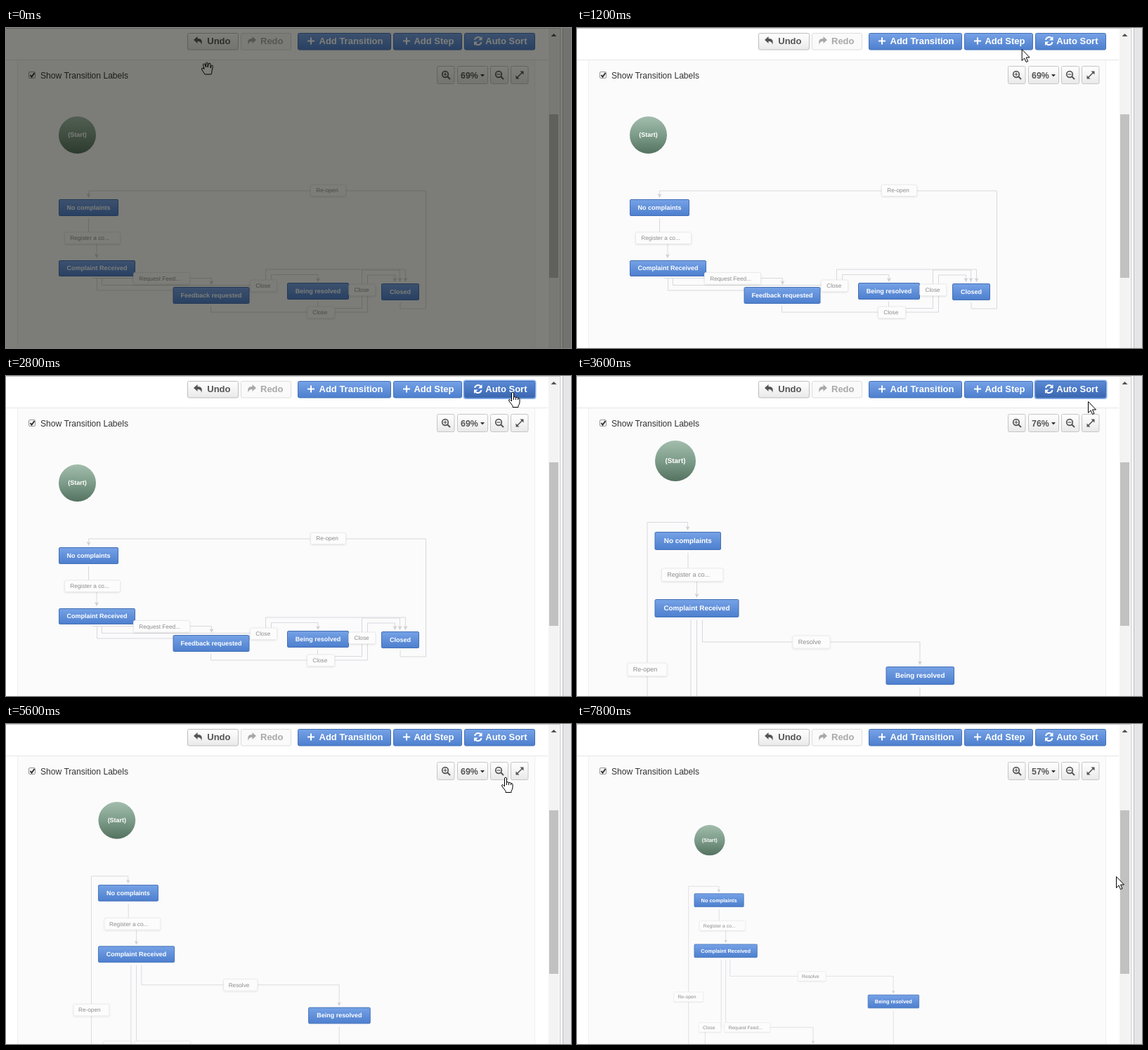
An HTML page that plays this animation: 804 by 456 pixels, repeating every 8 s.

```html
<!DOCTYPE html>
<html lang="en">
<head>
<meta charset="utf-8">
<title>Workflow editor</title>
<style>
  html, body { margin: 0; width: 100%; height: 100%; overflow: hidden; background: #fff; }
  svg { display: block; width: 804px; height: 456px; font-family: "Liberation Sans", Arial, sans-serif; }
  text { white-space: pre; }
  .wire { fill: none; stroke: #d9d9dc; stroke-linejoin: round; }
  .head { fill: #cfcfd3; }
  .node { fill: url(#blue); stroke: #4470b5; }
  .name { fill: #fff; font-weight: bold; text-anchor: middle; }
  .label { fill: #fcfcfc; stroke: #ebebed; filter: url(#soft); }
  .note { fill: #8c8c8c; }
  .btn { font-weight: bold; font-size: 13px; }
  .icon { fill: none; stroke: currentColor; stroke-width: 2; }
  .cursor { fill: #fff; stroke: #000; stroke-linejoin: round; }
</style>
</head>
<body>
<svg viewBox="0 0 804 456">
  <defs>
    <linearGradient id="blue" x2="0" y2="1"><stop stop-color="#76a2e6"/><stop offset="1" stop-color="#4d7fce"/></linearGradient>
    <linearGradient id="hover" x2="0" y2="1"><stop stop-color="#5f8fd9"/><stop offset="1" stop-color="#416fbb"/></linearGradient>
    <linearGradient id="active" x2="0" y2="1"><stop stop-color="#5a8ad6"/><stop offset="1" stop-color="#3a66b0"/></linearGradient>
    <linearGradient id="grey" x2="0" y2="1"><stop stop-color="#fff"/><stop offset="1" stop-color="#e9e9e9"/></linearGradient>
    <linearGradient id="green" x2="0" y2="1"><stop stop-color="#a3bdad"/><stop offset=".5" stop-color="#7d9c89"/><stop offset="1" stop-color="#557261"/></linearGradient>
    <filter id="soft" x="-10%" y="-20%" width="120%" height="150%"><feDropShadow dx="0" dy="1" stdDeviation="1" flood-opacity=".1"/></filter>
  </defs>
  <path fill="#fff" d="M0 0H804V456H0Z"/>
  <path fill="#fbfbfc" stroke="#efeff0" d="M16.5 45.5H752.5V460H16.5Z"/>
  <path stroke="#e6e6e6" d="M0 45.5H771"/>
  <g id="graphs"></g>
  <g id="bar"></g>
  <path fill="#f3f3f3" d="M772 1H787V456H772Z"/>
  <path fill="#c1c1c1" d="M773 123H786V356H773Z"/>
  <path fill="#505050" d="M775.5 12L779.5 8L783.5 12Z"/>
  <path stroke="#c4c4c6" d="M0 .5H789M788.5 0V456"/>
  <path fill="#e6e6e9" d="M792 0H804V456H792Z"/>
  <path stroke="#bcbcc0" d="M792.5 0V456"/>
  <g id="cursors"></g>
  <path id="dim" fill="#080800" opacity=".52" d="M0 0H804V456H0Z"/>
</svg>
<script>
const $ = id => document.getElementById(id);
const rect = (cls, x, y, w, h, r = 2, more = '') =>
  `<rect class="${cls}" x="${x}" y="${y}" width="${w}" height="${h}" rx="${r}" ${more}/>`;
const text = (cls, x, y, s, more = '') => `<text class="${cls}" x="${x}" y="${y}" ${more}>${s}</text>`;

// Workflow diagram: circle [x, y, r], wires, arrow tips, boxes [x, y, w, h, text]
function graph(id, size, { start: [cx, cy, r], wires, tips, nodes, labels }) {
  const name = (x, y, s) => text('name', x, y + size * .33, s, `font-size="${size}"`);
  return `<g id="${id}" text-rendering="geometricPrecision">` +
    `<path class="wire" d="${wires}"/>` +
    tips.map(([x, y]) => `<path class="head" d="M${x} ${y + 1}l-3 -6l3 1.5l3 -1.5Z"/>`).join('') +
    `<circle cx="${cx}" cy="${cy}" r="${r}" fill="url(#green)"/>` + name(cx, cy - .5, '(Start)') +
    nodes.map(([x, y, w, h, s]) => rect('node', x, y, w, h, 1.5) + name(x + w / 2, y + h / 2, s)).join('') +
    labels.map(([x, y, w, h, s]) => rect('label', x, y, w, h) +
      text('note', x + 7.7, y + h / 2 + size * .31, s, `font-size="${size * .92}"`)).join('') + '</g>';
}

$('graphs').innerHTML = graph('before', 9, {
  start: [101.5, 152.5, 26.5],
  wires: `M561 391V400H597.5V232H117.5V240 M117.5 271V299H129V327 M123 356.5H292.5V364
    M136.5 357V366.5H369.5V344H568.5V361 M129.5 357V374H377.5V351.5H444V361
    M291.5 396V405H514.5V352H553.5V361 M443.5 390V399.5H506.5V345H560.5V361`,
  tips: [[117.5, 241], [129, 327], [292.5, 365], [444, 361], [553.5, 361], [560.5, 361], [568.5, 361]],
  nodes: [[75.5, 244.5, 84, 23, 'No complaints'], [75.5, 331.5, 108, 22, 'Complaint Received'],
    [238, 369.5, 108, 23, 'Feedback requested'], [400.5, 363.5, 87, 23, 'Being resolved'],
    [534.5, 364.5, 53, 23, 'Closed']],
  labels: [[433.5, 223.5, 50, 16, 'Re-open'], [83.5, 291, 79, 16.5, 'Register a co...'],
    [181.5, 348.5, 80, 16.5, 'Request Feed...'], [347.5, 359, 38, 16.5, 'Close'],
    [487.8, 365, 38, 16.5, 'Close'], [428.5, 397, 39, 16.5, 'Close']]
}) + graph('after', 9.85, {
  start: [140, 121, 29],
  wires: `M100 540V208.5H157.5V219 M158 252V283H170.5V314 M178.5 348V379H488V410
    M162 348V476H131.5V540 M170.5 348V476H336V506 M488 444V540`,
  tips: [[157.5, 219], [170.5, 315], [488, 411], [336, 506]],
  nodes: [[111, 222.5, 93.5, 25, 'No complaints'], [111, 318.5, 119, 25, 'Complaint Received'],
    [440, 414.5, 96.5, 25, 'Being resolved']],
  labels: [[120.5, 274, 87.5, 18.5, 'Register a co...'], [307, 370, 53, 18, 'Resolve'],
    [72, 409, 56, 18.5, 'Re-open'], [119.4, 467, 42, 18, 'Close'], [167.8, 467, 87, 18, 'Request Feed...']]
});

// Toolbar
const button = (x, w, s, color, fill, border, icon, id = '') =>
  `<g color="${color}">` + rect('btn', x, 7.5, w, 23.5, 2, `${id} fill="${fill}" stroke="${border}"`) +
  icon + text('btn', x + w - 11, 23, s, 'fill="currentColor" text-anchor="end"') + '</g>';
const plus = x => `<path class="icon" stroke-width="2.4" d="M${x} 18.5h10m-5 -5v10"/>`;
const back = '<path fill="currentColor" d="M0 5L5.5 0V3C11 3 13 6 11 12C11 8.500 9 7 5.5 7V10Z"/>';
const small = (x, w, inner) => rect('', x, 54.5, w, 25, 2, 'fill="url(#grey)" stroke="#c6c6c6"') +
  `<g color="#555">${inner}</g>`;
const lens = (x, sign) => `<circle class="icon" cx="${x}" cy="66" r="4.300" style="stroke-width:1.7"/>` +
  `<path class="icon" d="M${x + 3} 69l4 4"/><path class="icon" style="stroke-width:1.2" d="${sign}"/>`;
const sync = `<g class="icon"><path d="M667 17a5 5 0 0 1 8.500 -2.500M676.500 20a5 5 0 0 1 -8.500 2.500"/>
  <path fill="currentColor" stroke="none" d="M677.500 12v5.500h-5.500ZM666 25v-5.500h5.500Z"/></g>`;

$('bar').innerHTML =
  button(258.5, 72, 'Undo', '#555', 'url(#grey)', '#bdbdbd', `<g transform="translate(267 12)">${back}</g>`) +
  button(334.5, 71, 'Redo', '#a9a9a9', '#fafafa', '#dcdcdc', `<g transform="translate(356 12) scale(-1 1)">${back}</g>`) +
  button(415.5, 132, 'Add Transition', '#fff', 'url(#blue)', '#4470b5', plus(429)) +
  button(551.5, 97, 'Add Step', '#fff', 'url(#blue)', '#4470b5', plus(565)) +
  rect('', 651.5, 6.5, 102, 25.5, 3, 'id="ring" fill="none" stroke="#8db4ee" stroke-width="2"') +
  button(652.5, 100, 'Auto Sort', '#fff', 'url(#blue)', '#4470b5', sync, 'id="sort"') +
  rect('', 32.5, 62.5, 9, 9, 1.5, 'fill="#f4f4f4" stroke="#999"') +
  '<path fill="none" stroke="#333" stroke-width="2" d="M34.500 67l2 2.500l4 -5.500"/>' +
  text('', 49, 72, 'Show Transition Labels', 'font-size="12.1" fill="#333"') +
  small(613.5, 24.5, lens(625, 'M622.500 66h5m-2.500 -2.500v5')) +
  small(642.5, 43, text('', 647, 72, '', 'id="zoom" font-size="12.4" font-weight="bold" fill="#555"') +
    '<path fill="#333" d="M675 66h6l-3 3.500Z"/>') +
  small(689.5, 25, lens(701, 'M698.500 66h5')) +
  small(718.5, 24.5, `<path class="icon" style="stroke-width:1.6" d="M727 71l8 -8"/>
    <path fill="currentColor" d="M731.500 61.500h5v5ZM725.500 67.500v5h5Z"/>`);

// Pointer shapes, each with its hot spot at 0,0
const shapes = {
  grab: 'M-4 18L-8 12Q-9.500 9 -7 9L-5 10.500L-6.500 4Q-5.500 2 -4 3.500L-2.500 8V2Q-1.500 0 0 2V8L1.500 2.500Q3 1 4 3V9L5.500 5.500Q7 4.500 7.500 6.500L6 13Q6 16 5 18Z',
  arrow: 'M.5 .5V16.500L4 13L6.500 18.500L9 17.500L6.500 12H11.500Z',
  point: 'M-1.500 14V2Q0 0 1.500 2V8Q3 7 4.500 8.500Q6 7.500 7.500 9.500Q9.500 9 10 11V15Q10 18 8 20.500V22.500H0V20.500L-5 14Q-6.500 11.500 -4 11.500ZM1.500 8V12M4.500 8.500V12M7.500 9.500V12'
};
$('cursors').innerHTML = Object.keys(shapes).map(k => `<path class="cursor" id="${k}" d="${shapes[k]}"/>`).join('');

// Pointer path: time, x, y, shape from then on
const path = [
  [0, 287, 48, 'grab'], [200, 287, 48, 'grab'], [800, 470, 40, 'arrow'], [1400, 714, 25, 'point'],
  [1600, 721, 22, 'point'], [2800, 721, 22, 'point'], [3200, 723, 27, 'point'], [3400, 727, 34, 'arrow'],
  [3600, 727, 36, 'arrow'], [4200, 715, 84, 'arrow'], [4400, 715, 84, 'arrow'], [4800, 711, 77, 'point'],
  [5000, 711, 75, 'point'], [7400, 711, 75, 'point'], [7600, 712, 70, 'point'], [7800, 767, 217, 'arrow']
];
const clicks = [5200, 5800, 6600];
const ease = p => { p = Math.min(1, Math.max(0, p)); return p * p * (3 - 2 * p); };

function draw(t) {
  const i = path.findLastIndex(k => k[0] <= t);
  const a = path[i], b = path[i + 1] || a;
  const p = b === a ? 0 : (t - a[0]) / (b[0] - a[0]);
  for (const k in shapes) $(k).setAttribute('visibility', k === a[3] ? 'visible' : 'hidden');
  $(a[3]).setAttribute('transform', `translate(${a[1] + (b[1] - a[1]) * p} ${a[2] + (b[2] - a[2]) * p})`);

  const sorted = t >= 3200;
  const steps = clicks.reduce((n, c) => n + ease((t - c) / 400), 0);
  $('before').setAttribute('display', sorted ? 'none' : 'inline');
  $('after').setAttribute('display', sorted ? 'inline' : 'none');
  $('after').setAttribute('transform', `translate(336 300) scale(${1.1 ** -steps}) translate(-336 -300)`);
  $('zoom').textContent = (sorted ? Math.round(76 * 1.1 ** -Math.ceil(steps)) : 69) + '%';

  const style = t < 1400 || t >= 5400 ? 'blue' : t < 2000 ? 'hover' : 'active';
  $('sort').setAttribute('fill', `url(#${style})`);
  $('ring').setAttribute('visibility', t >= 2800 && t < 5400 ? 'visible' : 'hidden');
  $('dim').setAttribute('visibility', t < 200 ? 'visible' : 'hidden');
}

function tick(now) {
  draw(Math.floor(now % 8000 / 200) * 200);
  requestAnimationFrame(tick);
}
draw(0);
requestAnimationFrame(tick);
</script>
</body>
</html>
```
